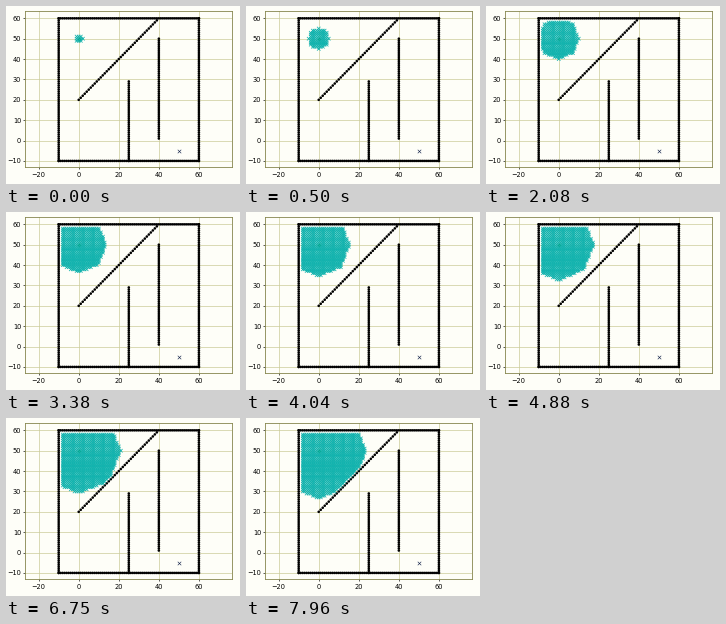
These frames come from a looping animation (234x178 px, 8000 ms). A matplotlib script:

```python
import math

import matplotlib.pyplot as plt
import numpy as np
from matplotlib.animation import FuncAnimation

W, H, DPI = 234, 178, 100
LOOP, STEP = 8000, 40
K = 0.417  # scale of the default matplotlib sizes
START, GOAL = (0, 50), (50, -5)
PAPER, CYAN, OLIVE, GRID = "#fefef8", "#12b3ae", "#85854c", "#cbcb98"


def build_walls():
    dots = [(x, y) for x in range(-10, 61) for y in (-10, 60)]
    dots += [(x, y) for y in range(-10, 61) for x in (-10, 60)]
    dots += [(25, y) for y in range(-10, 30)]
    dots += [(40, y) for y in range(1, 51)]
    dots += [(i, 20 + i) for i in range(40)]
    return dots


def dijkstra_order(walls, limit):
    """Cells in the order in which Dijkstra's search expands them."""
    blocked = {(x + dx, y + dy) for x, y in walls
               for dx, dy in ((0, 0), (1, 0), (-1, 0), (0, 1), (0, -1))}
    moves = ((1, 0), (0, 1), (-1, 0), (0, -1),
             (-1, -1), (-1, 1), (1, -1), (1, 1))
    frontier, closed, order = {START: 0.0}, set(), []
    while frontier and len(order) < limit:
        cell = min(frontier, key=frontier.get)
        cost = frontier.pop(cell)
        closed.add(cell)
        order.append(cell)
        for dx, dy in moves:
            near = (cell[0] + dx, cell[1] + dy)
            if near in blocked or near in closed:
                continue
            new_cost = cost + math.hypot(dx, dy)
            if new_cost < frontier.get(near, math.inf):
                frontier[near] = new_cost
    return order


def visited_count(ms):
    """The search slows as cells pile up; it is shown ten cells at a time."""
    a, b = 0.1586, 9.9e-5
    ticks = ms * 0.024
    n = 12 + (math.sqrt(a * a + 4 * b * ticks) - a) / (2 * b)
    return int(n // 10) * 10


def marks(points, marker, size, **style):
    xy = np.array(points, float)
    sizes = np.full(len(xy), size ** 2)
    return ax.scatter(xy[:, 0], xy[:, 1], s=sizes, marker=marker, **style)


walls = build_walls()
order = np.array(dijkstra_order(walls, 850), float)
# Whole steps of 1/4.8 give the cells their faint weave.
order = np.round(order * 4.8) / 4.8

fig = plt.figure(figsize=(W / DPI, H / DPI), dpi=DPI, facecolor=PAPER)
left, right, top, bottom = 19.3, 226.3, 5.2, 161.45
ax = fig.add_axes([left / W, 1 - bottom / H,
                   (right - left) / W, (bottom - top) / H], facecolor=PAPER)

marks(walls, "o", 4.5 * K, color="black", linewidths=0, zorder=2)
marks([START], "o", 7 * K, color="green", linewidths=0, zorder=3)
marks([GOAL], "x", 6 * K, color="#1c2a50", linewidths=0.45, zorder=3)
cells = marks(order[:10], "x", 6 * K, color=CYAN, linewidths=0.55, zorder=4)

ax.set_xlim(-26.67, 76.67)
ax.set_ylim(-13.2, 63.5)
ax.set_xticks(range(-20, 61, 20))
ax.set_yticks(range(-10, 61, 10))
ax.set_axisbelow(True)
ax.grid(color=GRID, linewidth=0.5)
ax.tick_params(labelsize=11.4 * K, length=3.5 * K, pad=3.5 * K, width=0.45)
for spine in ax.spines.values():
    spine.set(linewidth=0.6, edgecolor=OLIVE)


def draw(frame):
    n = visited_count(frame * STEP)
    cells.set_offsets(order[:n])
    cells.set_sizes(np.full(n, (6 * K) ** 2), DPI)
    return (cells,)


anim = FuncAnimation(fig, draw, frames=LOOP // STEP, interval=STEP,
                     init_func=lambda: draw(0), repeat=True, repeat_delay=0)
plt.show()
```
